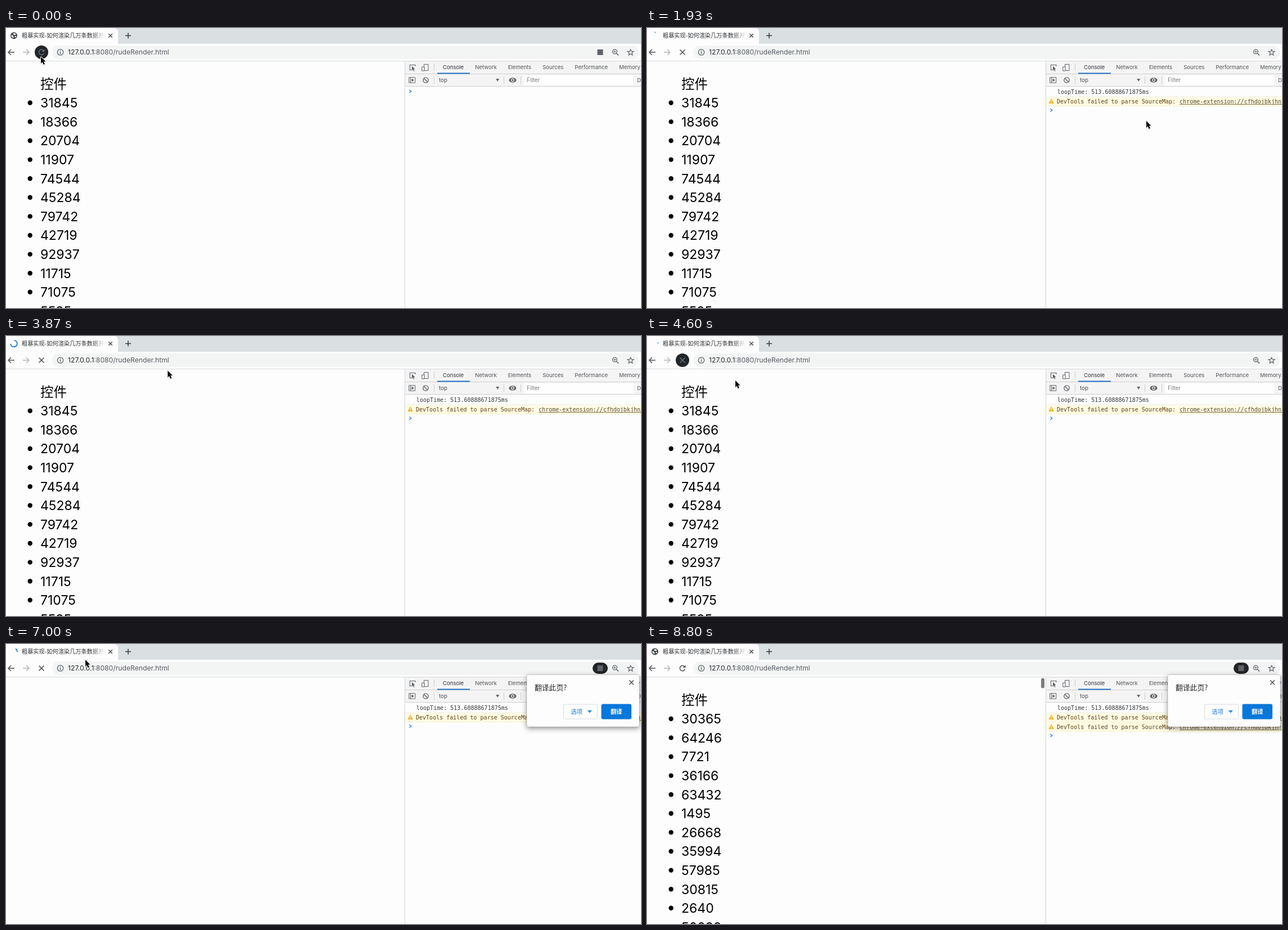
Write an HTML page with a canvas that moves like this. It is 1128 px wide and 497 px high and loops after 8870 ms.

```html
<!DOCTYPE html>
<html lang="zh">
<head>
<meta charset="utf-8">
<title>粗暴实现</title>
<style>
html, body { margin: 0; width: 100%; height: 100%; overflow: hidden; background: #fdfdfd; }
canvas { display: block; }
</style>
</head>
<body>
<canvas id="stage" width="1128" height="497"></canvas>
<script>
const ctx = document.getElementById('stage').getContext('2d');
const LOOP = 8870, STEP = 1000 / 15, TAU = Math.PI * 2;
const UI = 'Inter, "Noto Sans CJK SC", "Noto Sans CJK", sans-serif';
const CJK = '"Noto Sans CJK SC", "Noto Sans CJK", sans-serif';
const MONO = '"DejaVu Sans Mono", monospace';
const PAPER = '#fdfdfd', GREY = '#5f6368', PANEL = '#f4f4f4', BLUE = '#0b75d8';

const before = '31845 18366 20704 11907 74544 45284 79742 42719 92937 11715 71075 5595'.split(' ');
const after = '30365 64246 7721 36166 63432 1495 26668 35994 57985 30815 2640 50098'.split(' ');

// moments of the page's life, in ms
const AT = { load: 60, hideIcon: 130, log: 730, warn: 930, blank: 5530, popup: 5730, list: 8460, done: 8530 };

// where the pointer rests or turns
const track = [
  { t: 800, x: 62, y: 51 }, { t: 1930, x: 887, y: 165 }, { t: 2500, x: 887, y: 165 },
  { t: 2930, x: 790, y: 97 }, { t: 4400, x: 66, y: 46 }, { t: 4600, x: 157, y: 79 },
  { t: 5930, x: 113, y: 104 }, { t: 7000, x: 141, y: 28 }, { t: 7300, x: 152, y: -24 }
];

function pointer(t) {
  const i = Math.max(1, track.findIndex(p => p.t >= t));
  const [a, b] = t > 7300 ? track.slice(-2) : [track[i - 1], track[i]];
  const k = Math.max(0, Math.min(1, (t - a.t) / (b.t - a.t)));
  const s = k * k * (3 - 2 * k);
  return { x: a.x + (b.x - a.x) * s, y: a.y + (b.y - a.y) * s };
}

function rect(x, y, w, h, color) {
  ctx.fillStyle = color;
  ctx.fillRect(x, y, w, h);
}

function round(x, y, w, h, r, color, line) {
  ctx.beginPath();
  ctx.roundRect(x, y, w, h, r);
  if (color) { ctx.fillStyle = color; ctx.fill(); }
  if (line) { ctx.strokeStyle = line; ctx.lineWidth = 1; ctx.stroke(); }
}

function oval(x, y, rx, ry, color, turn = 0) {
  ctx.beginPath();
  ctx.ellipse(x, y, rx, ry, turn, 0, TAU);
  ctx.fillStyle = color;
  ctx.fill();
}

const disc = (x, y, r, color) => oval(x, y, r, r, color);

function ring(x, y, r, color, width, a = 0, b = TAU) {
  ctx.beginPath();
  ctx.arc(x, y, r, a, b);
  ctx.strokeStyle = color;
  ctx.lineWidth = width;
  ctx.stroke();
}

function line(color, width, ...p) {
  ctx.strokeStyle = color;
  ctx.lineWidth = width;
  ctx.beginPath();
  for (let i = 0; i < p.length; i += 2) ctx.lineTo(p[i], p[i + 1]);
  ctx.stroke();
}

function shape(color, ...p) {
  ctx.fillStyle = color;
  ctx.beginPath();
  for (let i = 0; i < p.length; i += 2) ctx.lineTo(p[i], p[i + 1]);
  ctx.fill();
}

function text(s, x, y, size, color, family = UI, weight = 400) {
  ctx.font = `${weight} ${size}px ${family}`;
  ctx.fillStyle = color;
  ctx.fillText(s, x, y);
  return x + ctx.measureText(s).width;
}

function cross(x, y, r, color, width) {
  line(color, width, x - r, y - r, x + r, y + r);
  line(color, width, x + r, y - r, x - r, y + r);
}

function plus(x, y, r, color, width) {
  line(color, width, x - r, y, x + r, y);
  line(color, width, x, y - r, x, y + r);
}

// "<" for a positive step, ">" for a negative one
const chevron = (x, y, step, r, color, width) => line(color, width, x + step, y - r, x, y, x + step, y + r);
const caret = (x, y, w, h, color) => shape(color, x - w / 2, y, x + w / 2, y, x, y + h);

// cubic-bezier(.4, 0, .2, 1)
function fastOutSlowIn(x) {
  let lo = 0, hi = 1;
  for (let i = 0; i < 20; i++) {
    const s = (lo + hi) / 2, q = 1 - s;
    if (1.2 * q * q * s + 0.6 * q * s * s + s * s * s < x) lo = s; else hi = s;
  }
  return lo * lo * (3 - 2 * lo);
}

// an arc that grows and shrinks in turn while the whole thing rotates
function spinner(t) {
  const half = 666, e = Math.max(0, t - 17);
  const grow = Math.floor(e / half) % 2;
  let sweep = 270 * (fastOutSlowIn((e % half) / half) - !grow);
  if (Math.abs(sweep) < 14) sweep = grow ? 14 : -14;
  const start = 282 + 360 * (t - 1930) / 1568 + 270 * (Math.floor(e / (2 * half)) - 1);
  const a = start * TAU / 360, b = (start + sweep) * TAU / 360;
  ring(14, 13.5, 5.8, BLUE, 1.7, Math.min(a, b), Math.max(a, b));
}

function globe() {
  disc(14, 13.5, 6, '#3f4346');
  oval(11.5, 15, 1.5, 2.8, PAPER, -0.7);
  oval(15, 10.8, 2.6, 1.5, PAPER, 0.2);
  disc(16.8, 15.2, 1.2, PAPER);
}

function tabStrip(t, loading) {
  rect(0, 0, 1128, 28, '#dadfe1');
  ctx.beginPath();
  ctx.roundRect(-9, 0, 208, 36, 7);
  ctx.fillStyle = PAPER;
  ctx.fill();
  text('粗暴实现-如何渲染几万条数据并', 28, 17.2, 10.2, '#303236', CJK);
  const fade = ctx.createLinearGradient(152, 0, 176, 0);
  fade.addColorStop(0, 'rgba(253,253,253,0)');
  fade.addColorStop(1, PAPER);
  rect(152, 4, 27, 20, fade);
  cross(185.5, 13.5, 3.3, '#4a4d51', 1.5);
  plus(217, 13.5, 5, '#3c4043', 1.6);
  if (loading) spinner(t); else globe();
}

function navArrow(tip, end, color) {
  line(color, 1.6, end, 43, tip, 43);
  chevron(tip, 43, Math.sign(end - tip) * 5, 5, color, 1.6);
}

function reloadIcon(color) {
  ring(63, 43, 4.6, color, 1.6, 0.35, TAU * 0.9);
  shape(color, 68.5, 37.5, 68.5, 42.3, 63.7, 42.3);
}

function star(x, y, r) {
  const p = [];
  for (let i = 0; i <= 10; i++) {
    const a = i * TAU / 10 - TAU / 4, d = i % 2 ? r * 0.43 : r;
    p.push(x + d * Math.cos(a), y + d * Math.sin(a));
  }
  line(GREY, 1.2, ...p);
}

function toolbar(hover, loading, translate, pill) {
  rect(0, 28, 1128, 30, PAPER);
  rect(0, 58, 1128, 1, '#d8d9e0');
  navArrow(4, 15, '#55595f');
  navArrow(41, 30, '#b6b9bc');
  if (hover) disc(63, 43, 12, '#222528');
  const color = hover ? '#64707a' : '#4d5156';
  if (loading) cross(63, 43, 4.5, color, 1.6); else reloadIcon(color);

  round(82, 31, 1042, 24, 12, '#f3f5f5');
  ring(96.5, 43, 5.2, GREY, 1.3);
  rect(95.8, 42, 1.4, 4, GREY);
  rect(95.8, 39.8, 1.4, 1.4, GREY);
  const x = text('127.0.0.1', 110, 47, 12.2, '#25272a');
  text(':8080/rudeRender.html', x, 47, 12.2, '#585c61');

  if (pill) round(1042, 33, 27, 20, 10, '#222427');
  if (translate || pill) rect(1050.5, 38, 10, 10, GREY);
  ring(1081.5, 42, 3.9, GREY, 1.4);
  line(GREY, 1.5, 1084.4, 45, 1088, 48.6);
  plus(1081.5, 42, 2, GREY, 1);
  star(1109.5, 43.4, 5.8);
}

function page(rows, scrollbar) {
  if (!rows) return;
  text('控件', 61, 107.5, 23.5, '#000', CJK);
  rows.forEach((n, i) => {
    const y = 132.8 + i * 33.6;
    disc(42.7, y, 4.2, '#000');
    text(n, 61, y + 8.4, 23, '#000');
  });
  if (scrollbar) round(700, 60.5, 6, 18, 3, '#7d7d7d');
}

function arrowShape(x, y, scale, color, outline) {
  ctx.save();
  ctx.translate(x, y);
  ctx.scale(scale, scale);
  const tail = () => line(color, 2.4, 2.8, 7, 5.8, 13.6);
  if (outline) {
    ctx.lineJoin = 'round';
    ctx.shadowColor = 'rgba(0,0,0,.3)';
    ctx.shadowBlur = 2;
    line('#fff', 2, 0, 0, 0, 12, 2.8, 9.6, 4.8, 14.2, 6.9, 13.3, 4.9, 8.7, 8.4, 8.5, 0, 0);
    ctx.shadowColor = 'transparent';
  }
  shape(color, 0, 0, 0, 12, 3.6, 8.7, 8.4, 8.5);
  tail();
  ctx.restore();
}

function devtools() {
  rect(709, 59, 419, 45, PANEL);
  rect(709, 81, 419, 1, '#d0d0d0');
  rect(709, 103, 419, 1, '#cfcfcf');
  rect(708, 59, 1, 438, '#d3d4d9');

  line(GREY, 1.1, 721, 74.5, 717.5, 74.5, 717.5, 65.5, 727, 65.5, 727, 68);
  arrowShape(721, 67.5, 0.65, GREY);
  round(742.5, 64.5, 7.5, 11, 0, null, GREY);
  round(738.8, 69, 4.4, 7, 0, PANEL, GREY);
  rect(760, 63, 1, 13, '#cccccc');
  let x = 776;
  for (const name of ['Console', 'Network', 'Elements', 'Sources', 'Performance', 'Memory'])
    x = text(name, x, 73, 9.6, x > 776 ? '#505357' : '#2f3135') + 20;
  rect(766, 79.5, 58, 2, '#2a72c4');

  round(715.8, 87.7, 11, 9.5, 0, null, GREY);
  line(GREY, 1, 718.5, 88, 718.5, 97);
  shape(GREY, 720.5, 89.8, 725, 92.5, 720.5, 95.2);
  ring(745.5, 92.5, 4.6, GREY, 1.4);
  line(GREY, 1.4, 742.3, 89.3, 748.7, 95.7);
  for (const bar of [760, 884, 914]) rect(bar, 86, 1, 13, '#cccccc');
  text('top', 769, 96, 9.8, '#4a4d51');
  caret(873.2, 90, 6.4, 5, '#6a6d70');
  oval(900, 92.5, 6.5, 4.3, GREY);
  disc(900, 92.5, 2.9, PANEL);
  disc(900, 92.5, 1.7, GREY);
  rect(920, 84, 194, 18, '#fefefe');
  text('Filter', 925, 96.3, 9.8, '#777a7e');
  text('D', 1121, 95.6, 9.6, '#505357');
}

function warning(y) {
  rect(709, y - 8, 419, 16, '#fffbe4');
  rect(709, y + 8, 419, 1, '#fdf2c8');
  caret(718.2, y + 4, 9.6, -9, '#e8b530');
  rect(717.6, y - 2, 1.2, 3, '#fff');
  rect(717.6, y + 1.8, 1.2, 1.2, '#fff');
  const x = text('DevTools failed to parse SourceMap: ', 728, y + 4, 10.03, '#5c4010', MONO) + 1;
  text('chrome-extension://cfhdojbkjhn', x, y + 4, 10.03, '#5c4a2a', MONO);
  rect(x, y + 5, 1128 - x, 1, '#7a6a48');
}

function consoleRows(logged, warnings) {
  let y = 113;
  if (logged) {
    text('loopTime: 513.60888671875ms', 729, y + 4, 10.03, '#36383b', MONO);
    rect(709, y + 8, 419, 1, '#f0f0f0');
    y += 17;
  }
  for (let i = 0; i < warnings; i++, y += 16.5) warning(Math.round(y));
  chevron(719.8, y - 0.4, -3.3, 2.7, '#3b82d6', 1.4);
}

function popup() {
  ctx.save();
  ctx.shadowColor = 'rgba(0,0,0,.42)';
  ctx.shadowBlur = 10;
  ctx.shadowOffsetY = 3;
  round(925, 54.5, 200, 92.5, 3, PAPER);
  ctx.restore();
  round(925, 54.5, 200, 92.5, 3, null, 'rgba(0,0,0,.16)');
  text('翻译此页?', 939, 81.5, 12.8, '#202124', CJK);
  cross(1111, 68.3, 3.9, '#55595d', 1.5);
  round(990.5, 107, 60, 26, 3, PAPER, '#d7dade');
  text('选项', 1003.5, 123.7, 10.3, '#1873cc', CJK, 500);
  caret(1036.8, 117.8, 8.5, 4.8, '#2196e8');
  round(1057.5, 106.5, 53.5, 27, 3, '#0877da');
  text('翻译', 1074, 123.7, 10.3, '#fff', CJK, 700);
}

function draw(t) {
  const loading = t >= AT.load && t < AT.done;
  const pill = t >= AT.popup;
  const near = p => Math.hypot(p.x - 63, p.y - 43) < 13;
  const pos = pointer(t);
  const hover = near(pos) || near(pointer(t - 200));

  rect(0, 0, 1128, 497, PAPER);
  tabStrip(t, loading);
  toolbar(hover, loading, t < AT.hideIcon, pill);
  page(t < AT.blank ? before : t >= AT.list ? after : null, t >= AT.list);
  devtools();
  consoleRows(t >= AT.log, (t >= AT.warn) + (t >= AT.done));
  if (pill) popup();
  arrowShape(pos.x, pos.y, 1, '#000', true);
}

const begin = performance.now();
function tick(now) {
  const t = Math.max(0, now - begin) % LOOP;
  const shown = Math.floor((t + 4) / STEP) * STEP;
  draw(Math.floor(shown / 10) * 10 % LOOP);
  requestAnimationFrame(tick);
}
draw(0);
requestAnimationFrame(tick);
</script>
</body>
</html>
```
